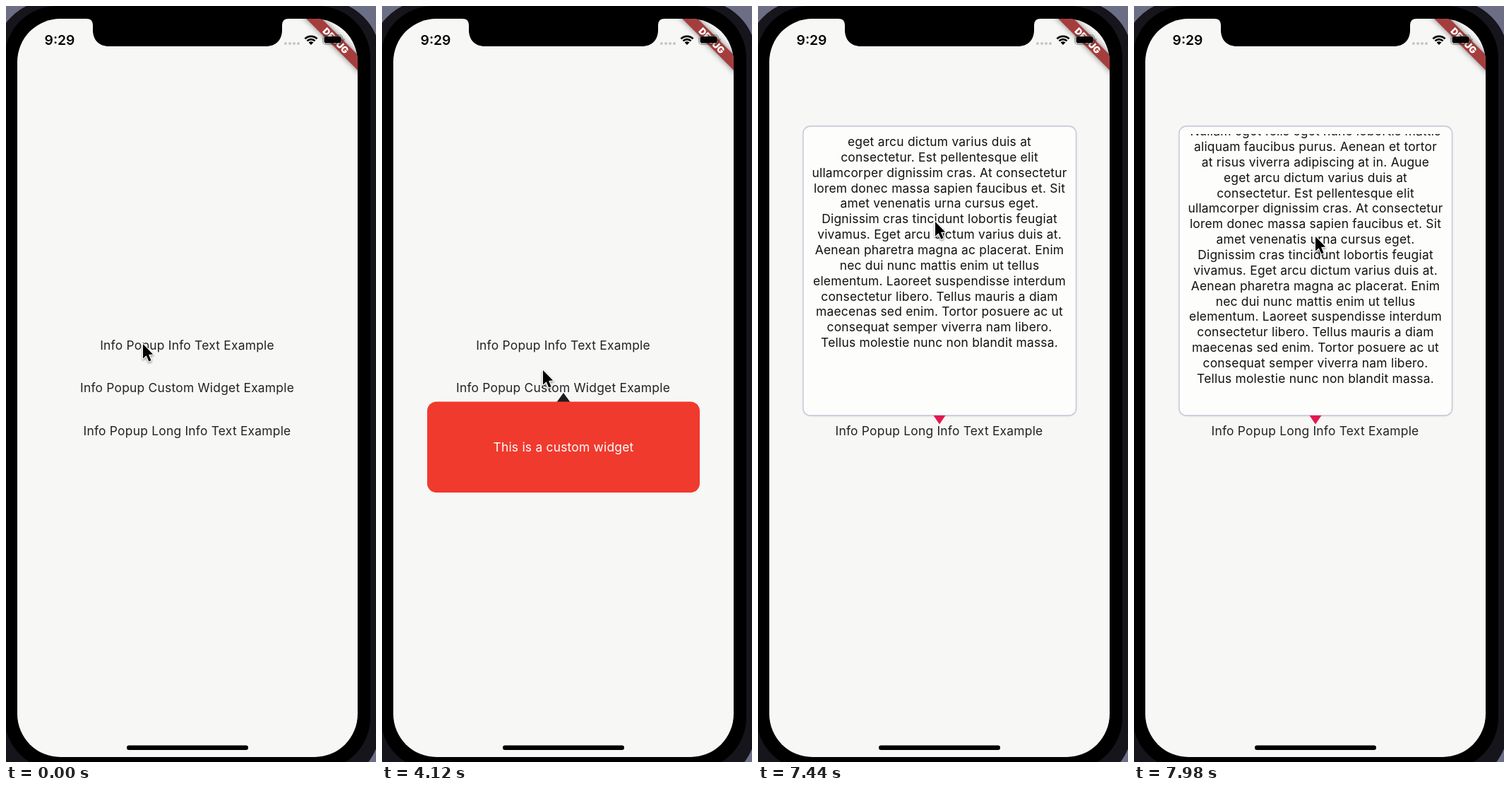
These frames come from a looping animation (524x1069 px, 8000 ms). An HTML page with a canvas:

```html
<!DOCTYPE html>
<html lang="en">
<head>
<meta charset="utf-8">
<title>Info Popup</title>
<style>
html, body { margin: 0; width: 100%; height: 100%; overflow: hidden; background: #000; }
canvas { display: block; width: 524px; height: 1069px; }
</style>
</head>
<body>
<canvas id="stage"></canvas>
<script>
const W = 524, H = 1069, LOOP = 8000;
const FAMILY = 'Inter, Roboto, sans-serif';
const canvas = document.getElementById('stage');
const ctx = canvas.getContext('2d');
const dpr = window.devicePixelRatio || 1;
canvas.width = W * dpr;
canvas.height = H * dpr;

const LINE = 21.85;
const VIEW = { top: 181, bottom: 569 };
const LINES = `Lorem ipsum dolor sit amet, consectetur
adipiscing elit, sed do eiusmod tempor
incididunt ut labore et dolore magna
aliqua. Enim lobortis scelerisque
fermentum dui faucibus in ornare quam
viverra. Consectetur adipiscing elit ut
aliquam purus sit. Nisl vel pretium lectus
quam. Et odio pellentesque diam volutpat
commodo. Diam vulputate ut pharetra sit
amet aliquam id diam maecenas.
Malesuada fames ac turpis egestas. Et
sollicitudin ac orci phasellus egestas tellus
rutrum. Pretium lectus quam id leo in.
Semper risus in hendrerit gravida. Nullam
ac tortor vitae purus faucibus ornare
suspendisse sed. Non tellus orci ac auctor.
Quis risus sed vulputate odio ut enim
blandit.
Nullam eget felis eget nunc lobortis mattis
aliquam faucibus purus. Aenean et tortor
at risus viverra adipiscing at in. Augue
eget arcu dictum varius duis at
consectetur. Est pellentesque elit
ullamcorper dignissim cras. At consectetur
lorem donec massa sapien faucibus et. Sit
amet venenatis urna cursus eget.
Dignissim cras tincidunt lobortis feugiat
vivamus. Eget arcu dictum varius duis at.
Aenean pharetra magna ac placerat. Enim
nec dui nunc mattis enim ut tellus
elementum. Laoreet suspendisse interdum
consectetur libero. Tellus mauris a diam
maecenas sed enim. Tortor posuere ac ut
consequat semper viverra nam libero.
Tellus molestie nunc non blandit massa.`.split('\n');
const MAX_SCROLL = LINES.length * LINE - (VIEW.bottom - VIEW.top);
const PEAK_SCROLL = 459.7;

// time, x, y of the pointer tip
const PATH = [
  [0, 194, 478], [1500, 194, 478], [2250, 209, 548], [2700, 209, 548],
  [3900, 228, 515], [4350, 228, 515], [5150, 247, 583], [5700, 247, 583],
  [6500, 249, 559], [6880, 249, 559], [7250, 251, 305], [7700, 251, 305],
  [7980, 257, 326], [8000, 257, 326]
];

const clamp = v => Math.min(1, Math.max(0, v));
const smooth = v => v * v * (3 - 2 * v);

function pointerAt(t) {
  const i = PATH.findIndex(k => k[0] > t);
  const [t0, x0, y0] = PATH[i - 1], [t1, x1, y1] = PATH[i];
  const k = smooth(clamp((t - t0) / (t1 - t0)));
  return [x0 + (x1 - x0) * k, y0 + (y1 - y0) * k];
}

// drag and fling past the end, then a critically damped spring back
function scrollAt(t) {
  const release = 7831;
  if (t < release) return PEAK_SCROLL * smooth(1 - Math.pow(1 - clamp((t - 6880) / 640), 1.7));
  const s = (t - release) * 0.0141;
  return MAX_SCROLL + (PEAK_SCROLL - MAX_SCROLL) * (1 + s) * Math.exp(-s);
}

function round(x, y, w, h, r, fill) {
  ctx.beginPath();
  ctx.roundRect(x, y, w, h, r);
  ctx.fillStyle = fill;
  ctx.fill();
}

function poly(points, fill) {
  ctx.beginPath();
  points.forEach(p => ctx.lineTo(...p));
  ctx.closePath();
  ctx.fillStyle = fill;
  ctx.fill();
}

function shadow(color, blur, y = 0) {
  ctx.shadowColor = color;
  ctx.shadowBlur = blur * dpr;
  ctx.shadowOffsetY = y * dpr;
}

function label(text, x, y, fill, font = '17.4px', spacing = 0.23) {
  ctx.font = font + ' ' + FAMILY;
  ctx.letterSpacing = spacing + 'px';
  ctx.textAlign = 'center';
  ctx.fillStyle = fill;
  ctx.fillText(text, x, y);
}

function screenPath() {
  ctx.beginPath();
  ctx.roundRect(16, 18, 482, 1044, 61);
}

function body() {
  ctx.fillStyle = '#6c6e85';
  ctx.fillRect(0, 0, W, H);
  round(-16, -8, 546, 1108, 80, '#15151b');
  round(-2, 0, 518, 1080, 74, '#000');
  screenPath();
  ctx.fillStyle = '#f7f7f6';
  ctx.fill();
}

function banner() {
  ctx.save();
  screenPath();
  ctx.clip();
  ctx.translate(498, 18);
  ctx.rotate(Math.PI / 4);
  shadow('rgba(0,0,0,.5)', 8);
  ctx.fillStyle = '#a53d3d';
  ctx.fillRect(-62, 36, 124, 15.4);
  shadow('transparent', 0);
  label('DEBUG', 0, 48.5, '#fff', '900 13.1px', 0);
  ctx.restore();
}

function notch() {
  ctx.beginPath();
  ctx.moveTo(114, 17);
  ctx.lineTo(114, 18);
  ctx.quadraticCurveTo(123, 18, 123, 27);
  ctx.lineTo(123, 34);
  ctx.bezierCurveTo(123, 48, 132, 57, 146, 57);
  ctx.lineTo(368, 57);
  ctx.bezierCurveTo(382, 57, 391, 48, 391, 34);
  ctx.lineTo(391, 27);
  ctx.quadraticCurveTo(391, 18, 400, 18);
  ctx.lineTo(400, 17);
  ctx.fillStyle = '#000';
  ctx.fill();
}

function wifi() {
  const x = 432, y = 55, a = Math.PI / 4;
  ctx.strokeStyle = ctx.fillStyle = '#000';
  ctx.lineWidth = 2.7;
  for (const r of [12.2, 7.9]) {
    ctx.beginPath();
    ctx.arc(x, y, r, -3 * a, -a);
    ctx.stroke();
  }
  ctx.beginPath();
  ctx.moveTo(x, y);
  ctx.arc(x, y, 4.8, -3 * a, -a);
  ctx.fill();
}

function statusBar() {
  label('9:29', 76, 55, '#000', '600 19.3px', 0);
  ctx.fillStyle = '#c6c6d0';
  for (let i = 0; i < 4; i++) {
    ctx.beginPath();
    ctx.arc(396 + i * 6, 53, 2.1, 0, 7);
    ctx.fill();
  }
  wifi();
  ctx.beginPath();
  ctx.roundRect(448.8, 41.2, 27.6, 13.2, 4.2);
  ctx.strokeStyle = 'rgba(0,0,0,.38)';
  ctx.lineWidth = 1.2;
  ctx.stroke();
  round(450.6, 43, 24, 9.6, 2.8, '#000');
  round(477.6, 45.6, 1.7, 4.4, [0, 2, 2, 0], 'rgba(0,0,0,.42)');
}

function customPopup() {
  poly([[257, 547], [266.5, 560], [247.5, 560]], '#1c1c20');
  round(64, 559.5, 386, 128.5, 13, '#f03a2e');
  label('This is a custom widget', 257, 630, '#fff');
}

function longPopup(scroll) {
  shadow('rgba(60,50,110,.22)', 3, 0.5);
  round(64, 170, 386.5, 409, 10, '#fdfdfc');
  shadow('transparent', 0);
  ctx.strokeStyle = '#c8c4d6';
  ctx.lineWidth = 1.3;
  ctx.stroke();
  poly([[248.5, 579], [265.5, 579], [257, 591.5]], '#e4184f');
  ctx.save();
  ctx.beginPath();
  ctx.rect(64, VIEW.top, 387, VIEW.bottom - VIEW.top);
  ctx.clip();
  LINES.forEach((line, i) => {
    const y = 197.8 + i * LINE - scroll;
    if (y > 165 && y < 590) label(line, 257, y, '#111');
  });
  ctx.restore();
}

function pointer([x, y]) {
  ctx.save();
  ctx.translate(x, y);
  shadow('rgba(0,0,0,.35)', 3, 1.5);
  const arrow = [[0, 0], [0, 20.5], [4.7, 16.2], [8.3, 24.6], [11.6, 23.2], [8.1, 15], [14.2, 14.6]];
  poly(arrow, '#fff');
  ctx.strokeStyle = '#fff';
  ctx.lineWidth = 2.4;
  ctx.lineJoin = 'round';
  ctx.stroke();
  shadow('transparent', 0);
  poly(arrow, '#000');
  ctx.restore();
}

function draw(t) {
  ctx.setTransform(dpr, 0, 0, dpr, 0, 0);
  body();
  label('Info Popup Info Text Example', 256.5, 486, '#222');
  label('Info Popup Custom Widget Example', 256.5, 546, '#222');
  label('Info Popup Long Info Text Example', 256.5, 607, '#222');
  if (t >= 2620 && t < 4300) customPopup();
  if (t >= 5500) longPopup(scrollAt(t));
  banner();
  notch();
  statusBar();
  round(171, 1045.5, 172, 6.5, 3.25, '#000');
  pointer(pointerAt(t));
}

const start = performance.now();
function tick() {
  draw((performance.now() - start) % LOOP);
  requestAnimationFrame(tick);
}
tick();
</script>
</body>
</html>
```
